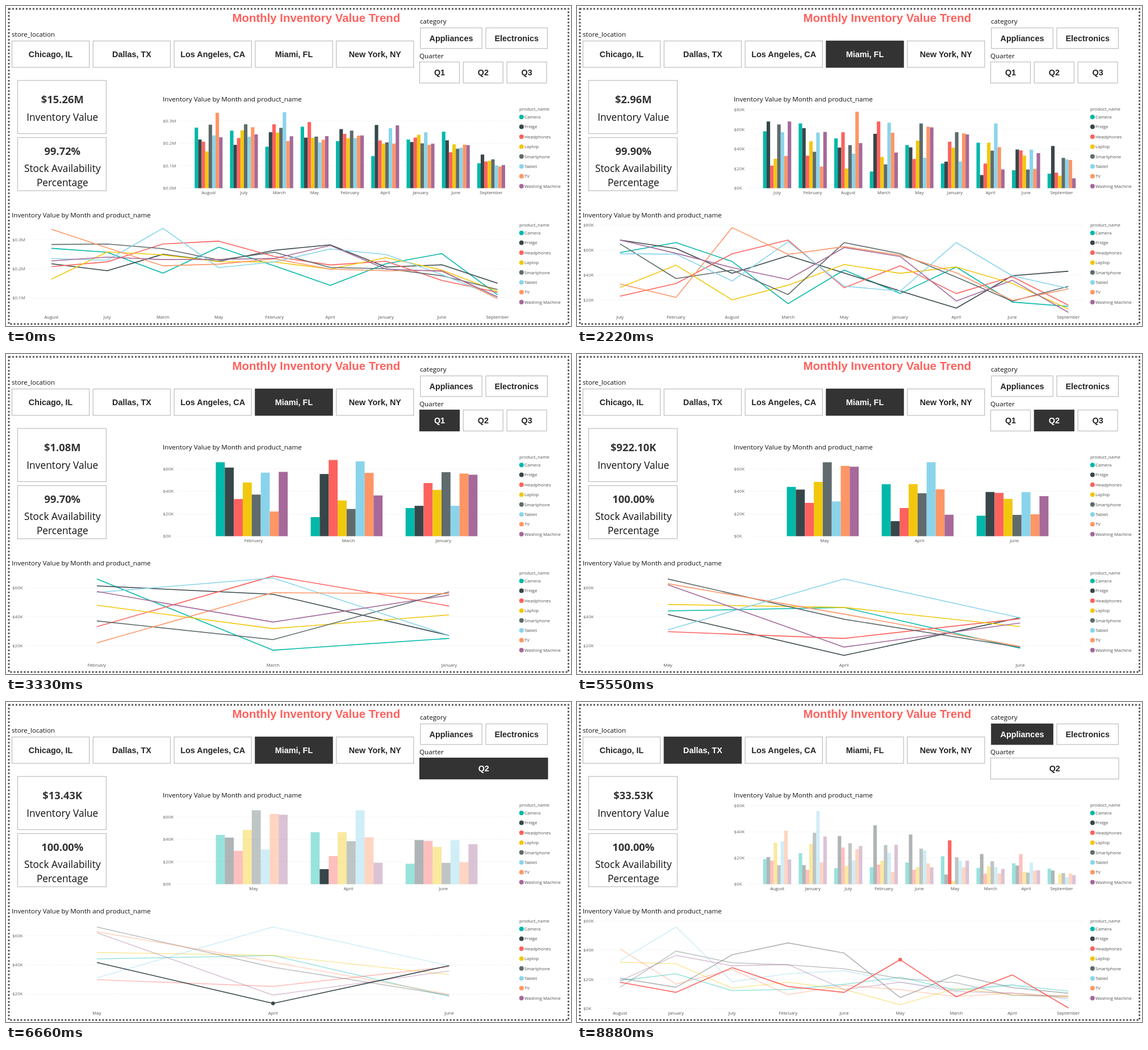
An HTML page that plays this animation: 995x563 px, repeating every 9.99 s.

```html
<!DOCTYPE html>
<html lang="en">
<head>
<meta charset="utf-8">
<title>Inventory dashboard</title>
<style>
html, body { margin: 0; width: 100%; height: 100%; overflow: hidden; background: #fff; }
svg { display: block; width: 995px; height: 563px; }
text { font-family: "Open Sans", "Noto Sans", sans-serif; }
.title, .button { font-family: "Liberation Sans", Arial, sans-serif; font-weight: bold; }
.title { font-size: 20.4px; fill: #fd625e; }
.button { font-size: 14.4px; }
.label { font-size: 11.65px; fill: #111; }
.value { font-size: 18.4px; font-weight: bold; fill: #333; }
.caption { font-size: 17.4px; fill: #111; }
.small { font-size: 7.8px; fill: #505050; }
.tick { font-size: 8px; fill: #666; }
.grid { stroke: #e4e4e4; stroke-width: 1; stroke-dasharray: 1 2; }
</style>
</head>
<body>
<svg id="stage" viewBox="0 0 995 563"></svg>
<script>
const STEP = 1110;
const PRODUCTS = ["Camera", "Fridge", "Headphones", "Laptop", "Smartphone", "Tablet", "TV", "Washing Machine"];
const COLORS = ["#01b8aa", "#374649", "#fd625e", "#f2c80f", "#5f6b6d", "#8ad4eb", "#fe9666", "#a66999"];
const STORES = ["Chicago, IL", "Dallas, TX", "Los Angeles, CA", "Miami, FL", "New York, NY"];
const CATEGORIES = ["Appliances", "Electronics"];
const QUARTERS = {
  Q1: ["January", "February", "March"],
  Q2: ["April", "May", "June"],
  Q3: ["July", "August", "September"]
};

function seeded(seed) {
  return () => {
    seed = (seed * 16807) % 2147483647;
    return seed / 2147483647;
  };
}

// Monthly averages fall from high to low, products scatter around them,
// and the striking points of each chart are pinned. Unit: thousand dollars.
function makeData({ months, seed, high, low, bend, spread, axis, pins }) {
  const random = seeded(seed * 7919);
  return Object.fromEntries(months.split(" ").map((month, m, list) => {
    const mean = high - (high - low) * (m / (list.length - 1)) ** bend;
    const noise = PRODUCTS.map(random);
    const center = noise.reduce((a, b) => a + b) / noise.length;
    const row = PRODUCTS.map((name, i) => {
      const value = mean * (1 + 2 * spread * (noise[i] - center));
      const bounded = Math.max(axis.min + 0.02 * axis.max, Math.min(0.85 * axis.max, value));
      return pins[name]?.[month] ?? bounded;
    });
    return [month, row];
  }));
}

const axes = {
  total: { tick: 100, min: 50, max: 350 },
  k80: { tick: 20, min: 10, max: 80 },
  k70: { tick: 20, min: 10, max: 70 },
  k60: { tick: 20, min: 0, max: 60 },
  k50: { tick: 20, min: 0, max: 50 }
};

const all = makeData({
  months: "August July March May February April January June September",
  seed: 11, high: 238, low: 114, bend: 6, spread: 0.2, axis: axes.total,
  pins: {
    Camera: { March: 185, April: 143, June: 252 },
    Fridge: { September: 150 },
    Laptop: { August: 164 },
    Smartphone: { July: 285 },
    Tablet: { March: 339, April: 268 },
    TV: { August: 336 }
  }
});
const chicago = makeData({
  months: "August July March May February April January June September",
  seed: 23, high: 50, low: 22, bend: 4, spread: 0.45, axis: axes.k80, pins: {}
});
const miami = makeData({
  months: "July February August March May January April June September",
  seed: 37, high: 50, low: 24, bend: 2.5, spread: 0.5, axis: axes.k80,
  pins: {
    Camera: { July: 58, February: 66, March: 17 },
    Fridge: { May: 41.6, April: 13.4, June: 39.4, September: 43 },
    Headphones: { July: 23, August: 57 },
    Laptop: { July: 30, August: 20 },
    Smartphone: { July: 65, June: 19 },
    Tablet: { May: 31, April: 66 },
    TV: { February: 22, August: 78 },
    "Washing Machine": { July: 68, May: 62, September: 10 }
  }
});
const newYork = makeData({
  months: "April March July May February January August June September",
  seed: 41, high: 25, low: 11, bend: 3, spread: 0.5, axis: axes.k50,
  pins: {
    Camera: { April: 27, March: 17.5, July: 29, May: 32.5, February: 19, January: 14, August: 46.4, June: 20, September: 16.5 },
    Smartphone: { August: 2 },
    Tablet: { March: 47.7, July: 3.5 }
  }
});
const dallas = makeData({
  months: "August January July February June May March April September",
  seed: 53, high: 27, low: 9, bend: 1.1, spread: 0.6, axis: axes.k60,
  pins: {
    Fridge: { February: 45, June: 38 },
    Headphones: { August: 18, January: 11, July: 28, February: 15, June: 11, May: 33.5, March: 8, April: 23, September: 0.3 },
    Laptop: { May: 2.5 },
    Tablet: { January: 56 }
  }
});

function inQuarter(data, quarter) {
  return Object.fromEntries(Object.entries(data).filter(([month]) => QUARTERS[quarter].includes(month)));
}

const scenes = [
  { data: all, axis: axes.total, value: "$15.26M", stock: "99.72%" },
  { data: chicago, axis: axes.k80, value: "$3.07M", stock: "99.68%", store: 0 },
  { data: miami, axis: axes.k80, value: "$2.96M", stock: "99.90%", store: 3 },
  { data: inQuarter(miami, "Q1"), axis: axes.k70, value: "$1.08M", stock: "99.70%", store: 3, quarter: "Q1" },
  { data: inQuarter(miami, "Q3"), axis: axes.k80, value: "$958.64K", stock: "100.00%", store: 3, quarter: "Q3" },
  { data: inQuarter(miami, "Q2"), axis: axes.k70, value: "$922.10K", stock: "100.00%", store: 3, quarter: "Q2" },
  { data: inQuarter(miami, "Q2"), axis: axes.k70, value: "$13.43K", stock: "100.00%", store: 3, quarter: "Q2",
    only: "Q2", focus: ["April", 1] },
  { data: newYork, axis: axes.k50, value: "$46.35K", stock: "100.00%", store: 4, category: 0,
    only: "Q3", focus: ["August", 0] },
  { data: dallas, axis: axes.k60, value: "$33.53K", stock: "100.00%", store: 1, category: 0,
    only: "Q2", focus: ["May", 2] }
];

const text = (x, y, kind, content, anchor = "start", extra = "") =>
  `<text x="${x}" y="${y}" class="${kind}" text-anchor="${anchor}" ${extra}>${content}</text>`;
const rect = (x, y, w, h, extra) =>
  `<rect x="${x}" y="${y}" width="${w}" height="${h}" ${extra}/>`;
const box = (x, y, w, h, fill = "#fff", stroke = "#bdbdbd") =>
  rect(x, y, w, h, `fill="${fill}" stroke="${stroke}" stroke-width="1.2"`);

function button(x, y, w, h, label, selected) {
  return (selected ? box(x, y, w, h, "#333", "#333") : box(x, y, w, h)) +
    text(x + w / 2, y + h / 2 + 4.9, "button", label, "middle", `fill="${selected ? "#fff" : "#252423"}"`);
}

function legend(top) {
  return text(904, top, "small", "product_name") + PRODUCTS.map((name, i) => {
    const y = top + 11.2 + i * 17.4;
    return `<circle cx="907.8" cy="${y}" r="4" fill="${COLORS[i]}"/>` + text(913, y + 2.7, "small", name);
  }).join("");
}

function frame() {
  return `<rect x="5" y="5" width="985.5" height="554.5" fill="none" stroke="#5a5a5a" stroke-width="3" stroke-dasharray="3 3"/>` +
    text(398.5, 28, "title", "Monthly Inventory Value Trend") +
    text(10, 54, "label", "store_location") +
    text(729, 31, "label", "category") +
    text(728, 91.5, "label", "Quarter") +
    text(276, 168, "label", "Inventory Value by Month and product_name") +
    text(10, 371.5, "label", "Inventory Value by Month and product_name") +
    legend(184) + legend(388);
}

function slicers(s) {
  const quarters = s.only
    ? button(728.5, 98.5, 225.5, 37, s.only, s.quarter === s.only)
    : Object.keys(QUARTERS).map((q, i) => button(728.5 + i * 76.8, 98.5, 70, 37, q, s.quarter === q)).join("");
  return STORES.map((name, i) => button(10.5 + i * 142.8, 61.5, 136.2, 46.5, name, s.store === i)).join("") +
    CATEGORIES.map((name, i) => button(729.8 + i * 115.2, 38.5, 108.4, 36.3, name, s.category === i)).join("") +
    quarters;
}

function cards(s) {
  return box(20.5, 131, 156, 93.5) + box(20.5, 231.5, 156, 93.5) +
    text(99.3, 170.5, "value", s.value, "middle") +
    text(99.3, 201.5, "caption", "Inventory Value", "middle") +
    text(99.3, 261.5, "value", s.stock, "middle") +
    text(99.3, 292, "caption", "Stock Availability", "middle") +
    text(99.3, 317, "caption", "Percentage", "middle");
}

function gridLines({ tick, max }, left, from, yOf) {
  const inMillions = tick === 100;
  const start = left + (inMillions ? 30 : 26);
  let out = "";
  for (let v = Math.ceil(from / tick) * tick; v <= max; v += tick) {
    const label = inMillions ? `$${(v / 1000).toFixed(1)}M` : `$${v}K`;
    const y = yOf(v);
    out += `<line class="grid" x1="${start}" x2="890" y1="${y}" y2="${y}"/>` + text(left, y + 2.8, "tick", label);
  }
  return out;
}

function barChart(s, months) {
  const { max, tick } = s.axis;
  const [first, step, width, shift] = months.length === 3 ? [436, 167.1, 15.82, -3.2]
    : tick === 100 ? [356.8, 62.2, 6.14, 0] : [352.5, 62.62, 6.19, 0];
  const heightOf = v => v * 138 / max;
  let out = gridLines(s.axis, 276.5, 0, v => 320.5 - heightOf(v));
  months.forEach((month, m) => {
    const center = first + m * step;
    s.data[month].forEach((v, i) => {
      const lit = !s.focus || (s.focus[0] === month && s.focus[1] === i);
      out += rect(center + shift + (i - 4) * width, 320.5 - heightOf(v), width, heightOf(v),
        `fill="${COLORS[i]}" opacity="${lit ? 1 : 0.4}"`);
    });
    out += text(center, 331.3, "small", month, "middle");
  });
  return out;
}

function lineChart(s, months) {
  const { min, max, tick } = s.axis;
  const [first, step] = months.length === 3 ? [160, 310.25] : tick === 100 ? [80, 98.2] : [75.7, 98.7];
  const xOf = m => first + m * step;
  const yOf = v => 539 - (v - min) * 153.5 / (max - min);
  const focused = s.focus ? s.focus[1] : -1;
  const line = i => {
    const points = months.map((month, m) => `${xOf(m)},${yOf(s.data[month][i])}`).join(" ");
    const opacity = !s.focus || focused === i ? 1 : 0.4;
    return `<polyline points="${points}" fill="none" stroke="${COLORS[i]}" stroke-width="1.6" stroke-linejoin="round" opacity="${opacity}"/>`;
  };
  const order = [...PRODUCTS.keys()].sort((a, b) => (a === focused) - (b === focused));
  let out = gridLines(s.axis, 11, min, yOf) + order.map(line).join("");
  if (s.focus) {
    const [month, i] = s.focus;
    out += `<circle cx="${xOf(months.indexOf(month))}" cy="${yOf(s.data[month][i])}" r="3.2" fill="${COLORS[i]}"/>`;
  }
  return out + months.map((month, m) => text(xOf(m), 550, "small", month, "middle")).join("");
}

const stage = document.getElementById("stage");
let shown = -1;

function render(time) {
  const index = Math.floor(time / STEP) % scenes.length;
  if (index === shown) return;
  shown = index;
  const scene = scenes[index];
  const months = Object.keys(scene.data);
  stage.innerHTML = frame() + slicers(scene) + cards(scene) + barChart(scene, months) + lineChart(scene, months);
}

const began = performance.now();
function loop() {
  render(performance.now() - began);
  requestAnimationFrame(loop);
}
loop();
</script>
</body>
</html>
```
